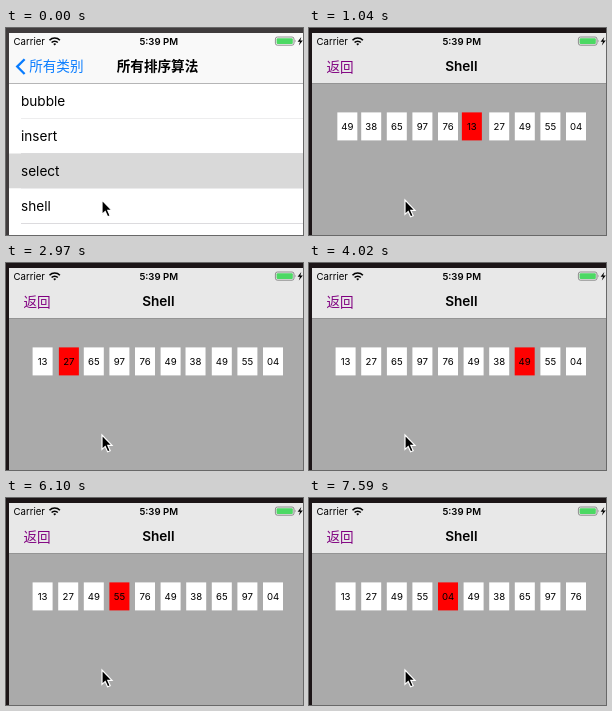
An HTML page that plays this animation: 297x207 px, repeating every 8 s.

```html
<!DOCTYPE html>
<html lang="zh">
<head>
<meta charset="utf-8">
<title>Shell sort</title>
<style>
  html, body { margin: 0; width: 100%; height: 100%; overflow: hidden; }
  svg { display: block; width: 100vw; height: 100vh; }
  text { font-family: Inter, "Noto Sans CJK SC", "Noto Sans CJK", sans-serif; font-size: 13.6px; }
  .small { font-size: 9.6px; }
  .bold { font-weight: 600; }
  .mid { text-anchor: middle; }
  .line { stroke: #d3d2d6; stroke-width: .8; }
</style>
</head>
<body>
<svg viewBox="0 0 297 207" xmlns="http://www.w3.org/2000/svg">
  <rect width="297" height="207" fill="#fff"/>

  <g id="list"></g>
  <rect id="dim" y="55" width="297" height="152" opacity="0"/>
  <rect y="5" width="297" height="50" fill="#f9f9f9"/>
  <rect y="55" width="297" height="1" fill="#b5b5b6"/>

  <g id="detail">
    <rect x="3" y="5" width="300" height="50" fill="#e8e8e8"/>
    <rect x="3" y="55" width="300" height="152" fill="#aaa"/>
    <rect x="3" y="55" width="300" height="1" fill="#949494"/>
    <g id="tiles"></g>
  </g>

  <g id="listBar">
    <path d="M18.6 31.2 11.2 38.6 18.6 46" fill="none" stroke="#087cff" stroke-width="2.3"/>
    <text x="23.2" y="43.4" fill="#087cff">所有类别</text>
    <text id="listTitle" class="bold mid" x="151.5" y="43.4">所有排序算法</text>
  </g>
  <g id="detailBar">
    <text x="17.5" y="43.6" fill="#800080">返回</text>
    <text id="detailTitle" class="bold mid" x="152.3" y="43.3">Shell</text>
  </g>

  <g id="status">
    <text class="small" x="7.6" y="16.6">Carrier</text>
    <g fill="none" stroke="#000" stroke-width="1.6">
      <path d="M43.5 12.2a7.2 7.2 0 0 1 10.4 0M45.6 14.5a4.3 4.3 0 0 1 6.2 0"/>
      <path d="M48.7 17.4 47.3 16a2 2 0 0 1 2.8 0Z" fill="#000" stroke="none"/>
    </g>
    <text class="small bold mid" x="152.7" y="16.6">5:39 PM</text>
    <rect x="269.4" y="9" width="18.6" height="8.2" rx="2" fill="none" stroke="#777" stroke-width=".8"/>
    <rect x="270.6" y="10.2" width="16.2" height="5.8" rx="1" fill="#4cd964"/>
    <path d="M288.9 11.6q1.3 1.5 0 3Z" fill="#777"/>
    <path d="M295.3 9 291.6 13.7H294L292.8 17.4 296.8 12.4H294.3Z"/>
  </g>

  <path id="frame" d="M0 0H297V5H3V207H0Z"/>
  <path d="M96 172V186.4L99.2 183.4 101.6 188.8 104.2 187.7 101.8 182.4H106Z" stroke="#fff" stroke-width="1.2"/>
</svg>
<script>
const LOOP = 8000;
const TICKS = [0, 600, 750, 890, 1040, 1190, 1340, 1480, 2080,
  2530, 2680, 2820, 2970, 3120, 3570, 4020, 4170, 4320, 4460, 4610, 5060,
  5500, 5650, 5800, 5950, 6100, 6550, 7000, 7150, 7300, 7450, 7590];
const VALUES = ['49', '38', '65', '97', '76', '13', '27', '49', '55', '04'];
const SWAP_STARTS = [1000, 2515, 4010, 5498, 6995];
const GAP = 5, SWAP_TIME = 480, RED_TIME = 1050;
const TAP = 600, PUSH_START = 560, PUSH_TIME = 440;
const LEFT = 26.6, PITCH = 25.6, ROW_TOP = 55.5, ROW = 35;

const $ = id => document.getElementById(id);

function add(parent, tag, attrs, text = '') {
  const el = document.createElementNS('http://www.w3.org/2000/svg', tag);
  for (const key in attrs) el.setAttribute(key, attrs[key]);
  el.textContent = text;
  return parent.appendChild(el);
}

const rows = ['bubble', 'insert', 'select', 'shell'].map((name, i) => {
  const y = ROW_TOP + ROW * i;
  const back = add($('list'), 'rect', { x: 3, y, width: 300, height: ROW, fill: '#fff' });
  add($('list'), 'text', { x: 15, y: y + 22.3 }, name);
  add($('list'), 'path', { d: `M15 ${y + ROW}H303`, class: 'line' });
  return back;
});

const tiles = VALUES.map(value => {
  const group = add($('tiles'), 'g', {});
  const back = add(group, 'rect', { y: 84.4, width: 20, height: 28, fill: '#fff' });
  add(group, 'text', { x: 10, y: 102, class: 'small mid' }, value);
  return { group, back };
});

const clamp = v => Math.min(1, Math.max(0, v));
const move = (el, x) => el.setAttribute('transform', `translate(${x} 0)`);
const fade = (el, opacity) => el.setAttribute('opacity', opacity);
const fill = (el, color) => el.setAttribute('fill', color);

// cubic-bezier(.42, 0, .58, 1)
function easeInOut(x) {
  if (x <= 0 || x >= 1) return clamp(x);
  let lo = 0, hi = 1, s;
  for (let i = 0; i < 24; i++) {
    s = (lo + hi) / 2;
    const bx = 1.26 * s * (1 - s) ** 2 + 1.74 * s * s * (1 - s) + s ** 3;
    if (bx < x) lo = s; else hi = s;
  }
  return s * s * (3 - 2 * s);
}

// Critically damped spring of the page push
function pushProgress(t) {
  const elapsed = t - PUSH_START;
  if (t < TAP) return 0;
  if (elapsed >= PUSH_TIME) return 1;
  const k = elapsed * 0.01826;
  return 1 - (1 + k) * Math.exp(-k);
}

function drawPush(t) {
  const p = pushProgress(t);
  move($('list'), -90 * p);
  move($('detail'), 300 * (1 - p));
  move($('listTitle'), -110 * p);
  move($('detailTitle'), 130 * (1 - p));
  fade($('dim'), 0.1 * p);
  fade($('listBar'), clamp(1 - 1.4 * p));
  fade($('detailBar'), p);
  fill($('frame'), t < TAP ? '#403c3d' : '#1c1517');
  fill(rows[2], t < TAP ? '#d9d9d9' : '#fff');
  fill(rows[3], t < TAP ? '#fff' : '#d9d9d9');
}

function drawSort(t) {
  SWAP_STARTS.forEach((start, i) => {
    const p = easeInOut((t - start) / SWAP_TIME);
    const active = t >= start && t < start + RED_TIME;
    const low = tiles[i], high = tiles[i + GAP];
    move(low.group, LEFT + PITCH * (i + GAP * p));
    move(high.group, LEFT + PITCH * (i + GAP * (1 - p)));
    fill(high.back, active ? '#f00' : '#fff');
  });
}

const began = performance.now();

function draw() {
  const now = (performance.now() - began) % LOOP;
  const t = TICKS.filter(tick => tick <= now).pop();
  drawPush(t);
  drawSort(t);
  requestAnimationFrame(draw);
}
draw();
</script>
</body>
</html>
```
